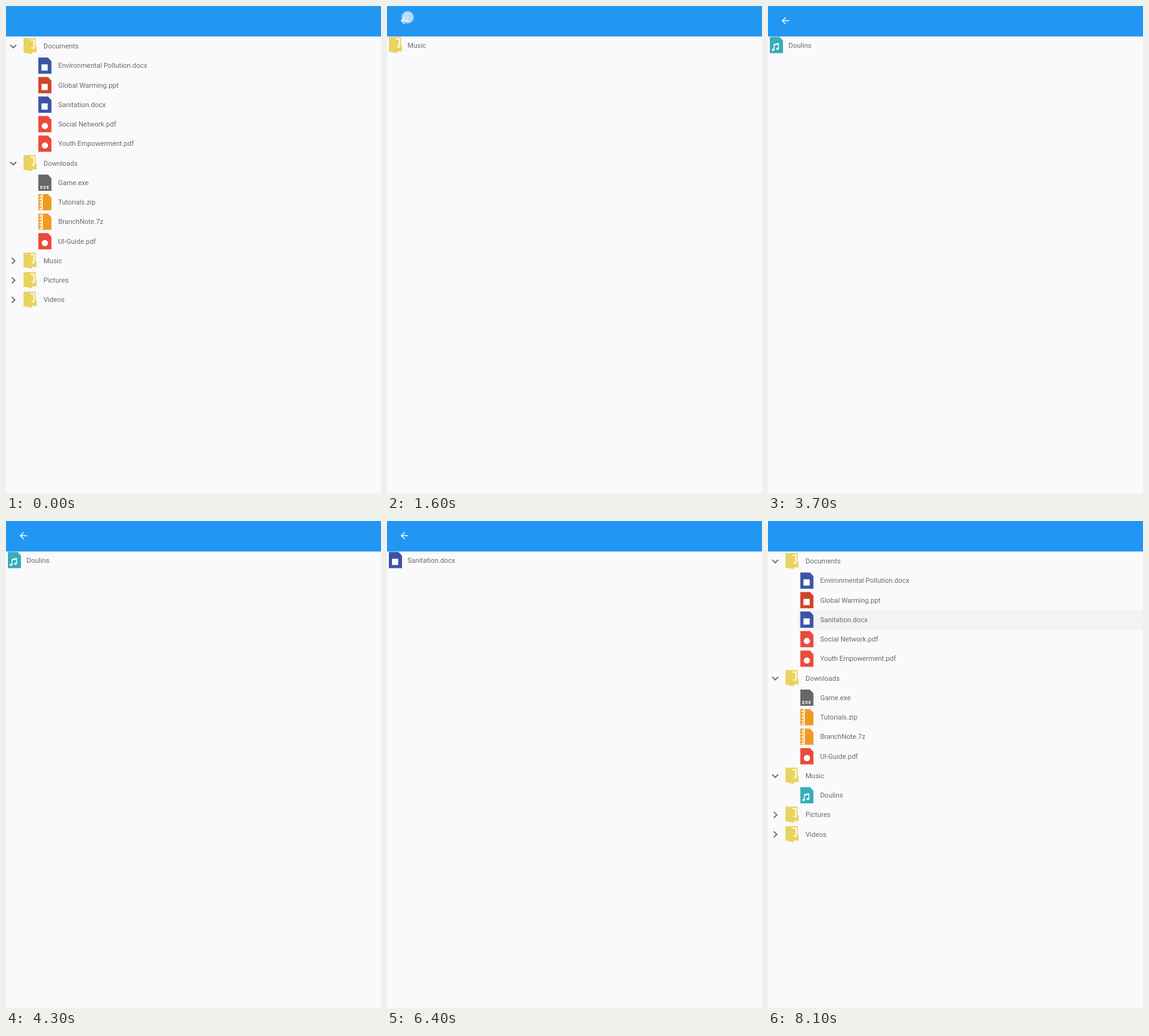
Animation, 600 px wide and 780 px high, one loop 8.2 s. Source, as an HTML page:

```html
<!DOCTYPE html>
<html lang="en">
<head>
<meta charset="utf-8">
<title>File tree</title>
<style>
  html, body { margin: 0; width: 100%; height: 100%; overflow: hidden; background: #faf9fb; }
  svg { display: block; width: 600px; height: 780px; }
  text { font: 11px Roboto, "Noto Sans", sans-serif; fill: #6b6b6d; }
  .exe { font-size: 7px; font-weight: 700; letter-spacing: .8px; fill: #fff; }
  .line { fill: none; stroke: #fff; }
  .chevron { fill: none; stroke: #6a6a6c; stroke-width: 1.8; }
</style>
</head>
<body>
<svg id="stage" viewBox="0 0 600 780">
  <defs>
    <radialGradient id="dot">
      <stop offset="0" stop-color="#fff" stop-opacity=".8"/>
      <stop offset=".4" stop-color="#fff" stop-opacity=".62"/>
      <stop offset=".66" stop-color="#fff" stop-opacity=".75"/>
      <stop offset=".78" stop-color="#eef3f7" stop-opacity=".6"/>
      <stop offset=".9" stop-color="#dfe5ea" stop-opacity=".6"/>
      <stop offset="1" stop-color="#c8ced4" stop-opacity=".15"/>
    </radialGradient>
  </defs>
  <g id="tree"></g>
  <g id="detail"></g>
  <rect width="600" height="48.8" fill="#2196f3"/>
  <path id="back" fill="#fff" transform="translate(19 14.8) scale(.73)"
    d="M20 11H7.8l5.6-5.6L12 4l-8 8 8 8 1.4-1.4L7.8 13H20z"/>
  <circle id="touch" r="10.5" fill="url(#dot)"/>
</svg>
<script>
const LOOP = 8200, TICK = 100, FADE = 220, TOUCH = 200, DELAY = 150;
const ROW = 31.25, TOP = 49, MID_X = 300, MID_Y = 414.5;
const $ = id => document.getElementById(id);

const sheet = (color, mark) => `<path fill="${color}" d="M0 0H15.5L21 6V26H0z"/>${mark}`;
const square = '<rect x="5" y="11" width="10" height="10" fill="#fff"/>';
const disc = '<circle cx="10.5" cy="16" r="5" fill="#fff"/>';
const teeth = [1, 6, 11, 16, 21].map(y => `M6.6 ${y}L2.2 ${y + 3}L6.6 ${y + 4}`).join('');

const icons = {
  folder: `<path fill="#e9d35f" d="M0 0H19.5V14H21V23H13.5V26L0 23.3z"/>
    <path fill="#fdf9e8" d="M11 2.2H17.8V17H12.8V15H15.6V4.4H11z"/>`,
  doc: sheet('#3b55a5', square),
  ppt: sheet('#cf4529', square),
  pdf: sheet('#e94b39', disc),
  exe: sheet('#676769', '<text class="exe" x="3" y="22.6">EXE</text>'),
  zip: sheet('#f09b20', `<path class="line" stroke-width="1.2" d="M6.6 0V26${teeth}"/>`),
  song: sheet('#36adbb', `<path class="line" stroke-width="1.4" d="M6.7 20.3V12L13.7 10.4V18.7M6.7 13L13.7 11.4"/>
    <g fill="#fff"><ellipse cx="5.2" cy="20.6" rx="2.2" ry="1.8"/><ellipse cx="12.2" cy="19" rx="2.2" ry="1.8"/></g>`)
};

const files = [
  ['Documents', 'folder'],
  ['Environmental Pollution.docx', 'doc'],
  ['Global Warming.ppt', 'ppt'],
  ['Sanitation.docx', 'doc'],
  ['Social Network.pdf', 'pdf'],
  ['Youth Empowerment.pdf', 'pdf'],
  ['Downloads', 'folder'],
  ['Game.exe', 'exe'],
  ['Tutorials.zip', 'zip'],
  ['BranchNote.7z', 'zip'],
  ['UI-Guide.pdf', 'pdf'],
  ['Music', 'folder'],
  ['Doulins', 'song'],
  ['Pictures', 'folder'],
  ['Videos', 'folder']
];
const MUSIC = 11, SONG = 12, REPORT = 3;

// Each visit: row tapped, time and place of the tap, then the tap on the back arrow.
const visits = [
  { row: MUSIC, open: 200, at: [205, 408], close: 1600, backAt: [33, 18] },
  { row: SONG, open: 3300, at: [280, 436], close: 4600, backAt: [31, 20] },
  { row: REPORT, open: 5600, at: [283, 158], close: 6800, backAt: [31, 21] }
];

const item = ([name, icon], iconX, iconY, textX, baseline) =>
  `<g transform="translate(${iconX} ${iconY})">${icons[icon]}</g>
   <text x="${textX}" y="${baseline}">${name}</text>`;

function treeMarkup(expanded, selected) {
  const shown = files.filter((f, i) => expanded || i !== SONG);
  return shown.map((file, i) => {
    const y = TOP + i * ROW, mid = y + ROW / 2;
    const folder = file[1] === 'folder';
    const left = folder ? 28 : 51.7;
    const isOpen = shown[i + 1] && shown[i + 1][1] !== 'folder';
    let out = '';
    if (file === files[selected])
      out += `<rect x="${left - 4.7}" y="${y}" width="600" height="${ROW}" fill="#f3f2f4"/>`;
    if (folder)
      out += `<path class="chevron" transform="translate(11.6 ${mid - .2}) rotate(${isOpen ? 90 : 0})"
        d="M-2.3 -4.8L2.5 0L-2.3 4.8"/>`;
    return out + item(file, left, y + 2.2, folder ? 60 : 83.4, mid + 3.6);
  }).join('');
}

function setMarkup(node, key, make) {
  if (node.dataset.key === key) return;
  node.dataset.key = key;
  node.innerHTML = make();
}

function pose(node, scale, alpha) {
  node.setAttribute('transform',
    `translate(${MID_X} ${MID_Y}) scale(${scale}) translate(${-MID_X} ${-MID_Y})`);
  node.setAttribute('opacity', alpha);
  node.style.display = alpha > 0 ? '' : 'none';
}

const progress = (t, start) => Math.min(1, Math.max(0, (t - start) / FADE));
const easeOut = (p, power) => 1 - (1 - p) ** power;
const mix = (a, b, p) => a + (b - a) * p;

function draw(t) {
  const visit = visits.filter(v => t >= v.open + DELAY).pop();
  const selected = visit ? visit.row : -1;
  const tree = $('tree'), detail = $('detail');
  setMarkup(tree, `tree${selected}`, () => treeMarkup(!!visit, selected));

  let away = false;
  if (!visit) {
    pose(tree, 1, 1);
    pose(detail, 1, 0);
  } else {
    setMarkup(detail, `detail${selected}`, () => item(files[selected], 3, 49.5, 32.8, 67));
    away = t < visit.close + DELAY;
    const p = progress(t, (away ? visit.open : visit.close) + DELAY);
    const size = easeOut(p, 5), alpha = easeOut(p, 3);
    if (away) {
      pose(tree, mix(1, .975, size), 1 - alpha);
      pose(detail, mix(1.125, 1, size), alpha);
    } else {
      pose(tree, mix(.975, 1, size), alpha);
      pose(detail, mix(1, 1.075, size), 1 - alpha);
    }
  }
  $('back').style.display = away ? '' : 'none';

  const pressed = start => t >= start && t < start + TOUCH;
  let spot = null;
  for (const v of visits) {
    if (pressed(v.open)) spot = v.at;
    if (pressed(v.close)) spot = v.backAt;
  }
  const touch = $('touch');
  touch.style.display = spot ? '' : 'none';
  if (spot) touch.setAttribute('transform', `translate(${spot})`);
}

const begin = performance.now();
function frame() {
  const t = (performance.now() - begin) % LOOP;
  draw(Math.floor(t / TICK) * TICK);
  requestAnimationFrame(frame);
}
frame();
</script>
</body>
</html>
```
